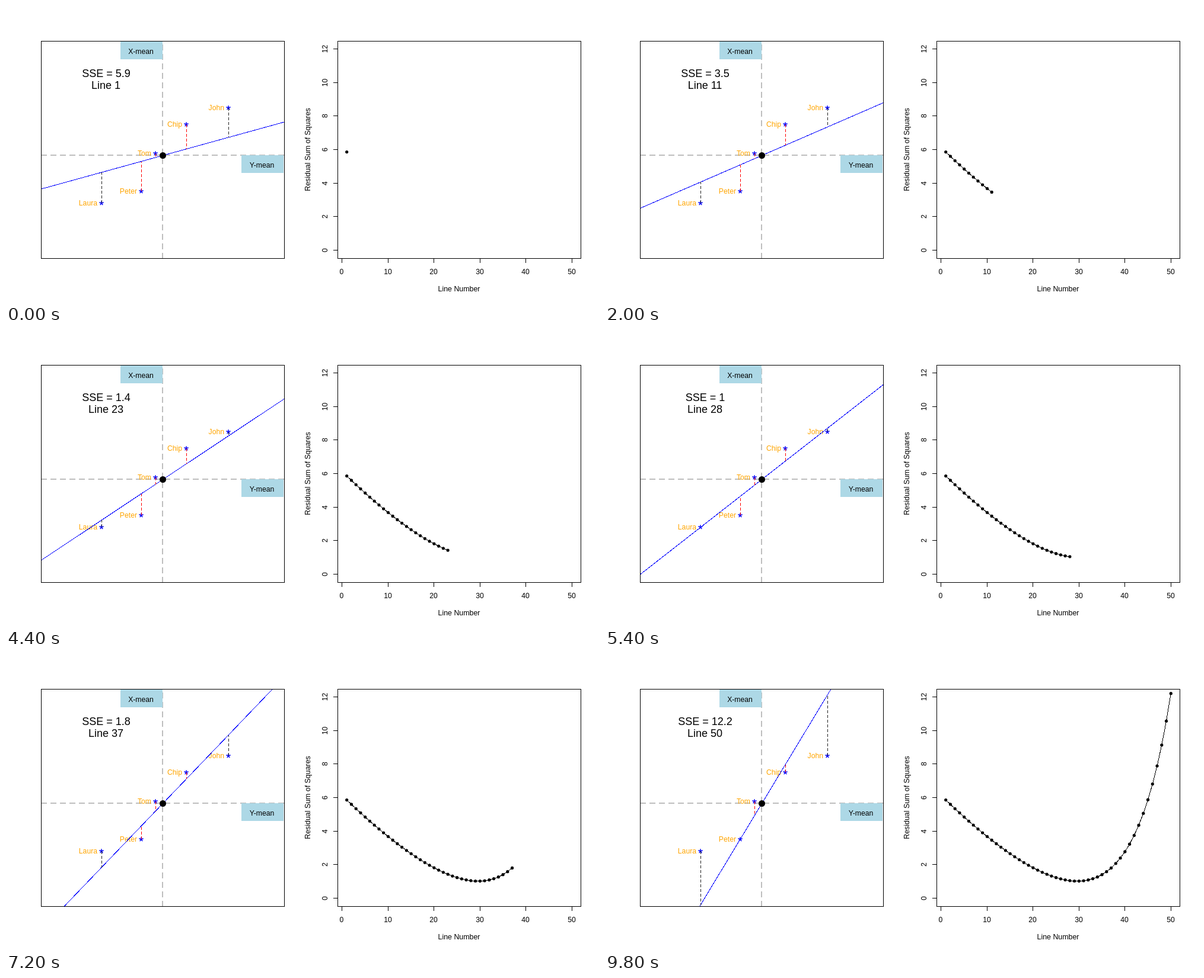
These frames come from a looping animation (1000x500 px, 10000 ms). An HTML page:

```html
<!DOCTYPE html>
<html lang="en">
<head>
<meta charset="utf-8">
<title>Least squares</title>
<style>
  html, body { margin: 0; width: 100%; height: 100%; overflow: hidden; background: #fff; }
  svg { display: block; width: 1000px; height: 500px; }
  text { font-family: "Liberation Sans", Arial, sans-serif; font-size: 12.2px; text-anchor: middle; }
  .title { font-size: 12.4px; }
  .big { font-size: 18px; }
  .crisp { shape-rendering: crispEdges; fill: none; stroke: #000; }
</style>
</head>
<body>
<svg id="stage" viewBox="0 0 1000 500">
  <clipPath id="clip"><rect x="59" y="59" width="411" height="368"/></clipPath>
</svg>
<script>
const STEP = 200, LINES = 50;
const MEAN = { x: 264.5, y: 252.5 };
const people = [
  ["Laura", 161, 333, "#222"],
  ["Peter", 228, 313, "red"],
  ["Tom", 252, 249, "red"],
  ["Chip", 304, 200, "red"],
  ["John", 375, 172, "#222"]
];
const stage = document.getElementById("stage");

function add(tag, attrs, text = "") {
  const el = document.createElementNS("http://www.w3.org/2000/svg", tag);
  for (const key in attrs) el.setAttribute(key, attrs[key]);
  el.textContent = text;
  return stage.appendChild(el);
}
const line = (x1, y1, x2, y2, more) => add("line", { x1, y1, x2, y2, class: "crisp", ...more });
const label = (x, y, text, more) => add("text", { x, y, ...more }, text);
const upright = (x, y, text, more) =>
  label(0, 0, text, { transform: `translate(${x} ${y}) rotate(-90)`, ...more });
const frame = x => add("rect", { x, y: 59.5, width: 410, height: 367, class: "crisp" });

// The line turns by equal angles; its squared error is a parabola in the slope.
const slope = n => 0.84 * Math.tan((18.19 + 0.917 * (n - 1)) * Math.PI / 180);
const sse = n => 1.018 + 16.1 * (slope(n) - 0.824) ** 2;
const lineY = (x, m) => MEAN.y - m * (x - MEAN.x);
const plotX = n => 566.95 + 7.747 * n;
const plotY = v => 412.5 - 28.35 * v;
const snap = v => Math.floor(v) + 0.5;

// Left panel
const dashed = { "stroke-dasharray": "10 6", "stroke-width": 2, style: "stroke:#bebebe" };
line(59, 252, 469, 252, dashed);
line(264, 427, 264, 60, dashed);
for (const [x, y, text] of [[193, 60, "X-mean"], [397, 252, "Y-mean"]]) {
  add("rect", { x, y, width: 71, height: 30, fill: "#add8e6" });
  label(x + 34.5, y + 21, text);
}
const sseText = label(169, 120, "", { class: "big" });
const lineText = label(168.5, 140, "", { class: "big" });

for (const [name, x, y] of people) {
  label(x - 7, y + 4, name, { fill: "orange", style: "text-anchor:end" });
  let d = "";
  for (let i = 0; i < 5; i++) {
    const a = (i * 72 - 90) * Math.PI / 180;
    d += `M${x} ${y}l${3.8 * Math.cos(a)} ${3.8 * Math.sin(a)}`;
  }
  add("path", { d, stroke: "blue", "stroke-width": 1.5 });
}
const fit = line(0, 0, 0, 0, { style: "stroke:blue", "clip-path": "url(#clip)" });
const residuals = people.map(([, x, y, color]) =>
  line(x + 0.5, y, x + 0.5, y, { style: "stroke:" + color, "stroke-dasharray": "5 3" }));
add("circle", { cx: MEAN.x, cy: MEAN.y, r: 5.5 });
frame(59.5);

// Right panel
frame(559.5);
for (let v = 0; v <= 50; v += 10) {
  const x = snap(plotX(v));
  line(x, 427, x, 434);
  label(x - 0.5, 453, v);
}
for (let v = 0; v <= 12; v += 2) {
  const y = snap(plotY(v));
  line(552, y, 559, y);
  upright(542, y, v);
}
label(764, 482, "Line Number", { class: "title" });
upright(513, 242.5, "Residual Sum of Squares", { class: "title" });
const curve = add("polyline", { class: "crisp" });
const points = [], dots = [];
for (let n = 1; n <= LINES; n++) {
  const cx = plotX(n), cy = plotY(sse(n));
  points.push(`${cx},${cy}`);
  dots.push(add("circle", { cx, cy, r: 2.6 }));
}

function show(n) {
  const m = slope(n);
  sseText.textContent = "SSE = " + Math.round(sse(n) * 10) / 10;
  lineText.textContent = "Line " + n;
  fit.setAttribute("x1", 59);
  fit.setAttribute("y1", lineY(59, m));
  fit.setAttribute("x2", 470);
  fit.setAttribute("y2", lineY(470, m));
  people.forEach(([, x], i) => residuals[i].setAttribute("y2", lineY(x, m)));
  curve.setAttribute("points", points.slice(0, n).join(" "));
  dots.forEach((dot, i) => dot.setAttribute("visibility", i < n ? "visible" : "hidden"));
}

let shown = 0;
function tick() {
  const n = Math.floor(performance.now() / STEP) % LINES + 1;
  if (n !== shown) show(shown = n);
  requestAnimationFrame(tick);
}
tick();
</script>
</body>
</html>
```
